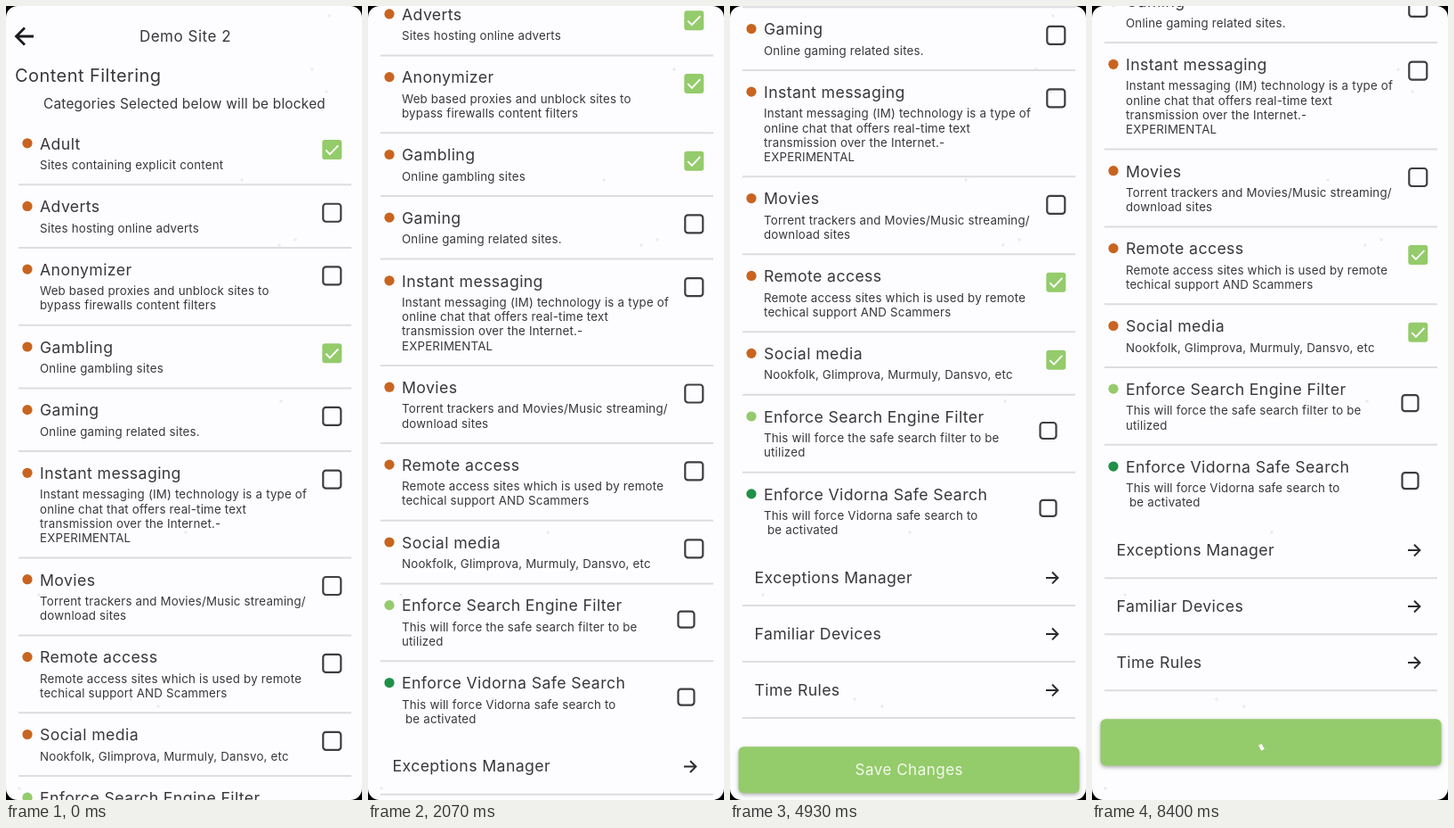
An HTML page that plays this animation: 400x890 px, repeating every 8.47 s.

```html
<!DOCTYPE html>
<html lang="en">
<head>
<meta charset="utf-8">
<title>Content Filtering</title>
<style>
  html, body { margin: 0; width: 100%; height: 100%; overflow: hidden; background: #000; }
  svg { display: block; width: 400px; height: 890px; border-radius: 13px; background: #fdfcfe; }
  text { font-family: Inter, "Open Sans", sans-serif; fill: #38373b; white-space: pre; }
  .bar { font-size: 17px; letter-spacing: .52px; }
  .head { font-size: 20px; letter-spacing: .45px; }
  .note { font-size: 15.4px; letter-spacing: .22px; }
  .title { font-size: 17.7px; letter-spacing: .38px; }
  .sub { font-size: 13.3px; letter-spacing: .2px; }
  .save { font-size: 17px; letter-spacing: .5px; fill: #f3faec; }
  .line { stroke: #dddce0; stroke-width: 2; }
  .arrow { fill: none; stroke: #2b2a2e; stroke-width: 2; }
  .back { fill: none; stroke: #1b1a1d; stroke-width: 2.8; }
  .box { fill: none; stroke: #3e3d42; stroke-width: 2.2; }
  .tick { fill: none; stroke: #fff; stroke-width: 1.9; }
  .button { fill: #94cb6b; filter: drop-shadow(0 2px 2px rgba(0, 0, 0, .3)); }
  .spin { fill: none; stroke: #fff; stroke-width: 4; stroke-linecap: square; }
  .speck { fill: #edebf0; }
</style>
</head>
<body>
<svg id="stage" viewBox="0 0 400 890"></svg>
<script>
(() => {
const LOOP = 8470;
const GREEN = '#94cb6b', ORANGE = '#c8641f', DARK = '#1f9048';
const stage = document.getElementById('stage');

function add(parent, tag, attrs, content) {
  const node = document.createElementNS('http://www.w3.org/2000/svg', tag);
  for (const key in attrs) node.setAttribute(key, attrs[key]);
  if (content) node.textContent = content;
  parent.appendChild(node);
  return node;
}

// on: time of the tap, or -1000 when ticked from the start
const rows = [
  { title: 'Adult', sub: ['Sites containing explicit content'], on: -1000 },
  { title: 'Adverts', sub: ['Sites hosting online adverts'], on: 415 },
  { title: 'Anonymizer', sub: ['Web based proxies and unblock sites to', 'bypass firewalls content filters'], on: 745 },
  { title: 'Gambling', sub: ['Online gambling sites'], on: -1000 },
  { title: 'Gaming', sub: ['Online gaming related sites.'] },
  { title: 'Instant messaging', sub: ['Instant messaging (IM) technology is a type of',
    'online chat that offers real-time text', 'transmission over the Internet.-', 'EXPERIMENTAL'] },
  { title: 'Movies', sub: ['Torrent trackers and Movies/Music streaming/', 'download sites'] },
  { title: 'Remote access', sub: ['Remote access sites which is used by remote', 'techical support AND Scammers'], on: 3200 },
  { title: 'Social media', sub: ['Nookfolk, Glimprova, Murmuly, Dansvo, etc'], on: 4210 },
  { title: 'Enforce Search Engine Filter', sub: ['This will force the safe search filter to be', 'utilized'], dot: GREEN, small: true },
  { title: 'Enforce Vidorna Safe Search', sub: ['This will force Vidorna safe search to', ' be activated'], dot: DARK, small: true }
];
const links = ['Exceptions Manager', 'Familiar Devices', 'Time Rules'];

const specks = [[344, 71], [363, 11], [360, 96], [265, 195], [325, 262], [307, 268],
  [309, 443], [37, 660], [140, 777], [171, 785], [15, 877], [202, 590]];
for (const [cx, cy] of specks) add(stage, 'circle', { class: 'speck', cx, cy, r: 1.8 });

const page = add(stage, 'g', {});
const ticks = [];

function label(cls, x, y, content, anchor = 'start') {
  return add(page, 'text', { class: cls, x, y, 'text-anchor': anchor }, content);
}

function divider(y) {
  add(page, 'line', { class: 'line', x1: 14, x2: 388, y1: y, y2: y });
}

function checkbox(cx, cy, size, on) {
  const g = add(page, 'g', { transform: `translate(${cx} ${cy})` });
  const square = (s, attrs) => add(g, 'rect', { x: -s / 2, y: -s / 2, width: s, height: s, rx: 3.2, ...attrs });
  const box = square(size, { class: 'box' });
  if (on === undefined) return;
  const fill = square(size + 2, { fill: GREEN });
  const tick = add(g, 'path', { class: 'tick', d: 'M-7 .3L-2.4 5L7 -4.8', pathLength: 1, 'stroke-dasharray': '1 2' });
  ticks.push({ on, box, fill, tick });
}

// Header
add(page, 'path', { class: 'back', d: 'M31 34H12M21 24.5L11.5 34L21 43.5' });
label('bar', 201.5, 39.5, 'Demo Site 2', 'middle');
label('head', 10, 85.3, 'Content Filtering');
label('note', 42, 114.6, 'Categories Selected below will be blocked');

// Categories
let rowTop = 129.6;
rows.forEach((row, i) => {
  add(page, 'circle', { cx: 24, cy: rowTop + 24.2, r: 5.6, fill: row.dot || ORANGE });
  label('title', 38, rowTop + 31, row.title);
  row.sub.forEach((s, n) => label('sub', s[0] === ' ' ? 42 : 38, rowTop + 53.3 + n * 16.25, s.trim()));
  if (row.small) checkbox(357.5, rowTop + 40.2, 18, row.on);
  else checkbox(366.3, rowTop + 31.5, 20, row.on);
  rowTop += 54.4 + 16.25 * row.sub.length;
  if (i < rows.length - 1) divider(rowTop);
});

// Links
links.forEach((name, i) => {
  const y = 1067.7 + i * 63;
  label('title', 27.5, y + 6.2, name);
  add(page, 'path', { class: 'arrow', d: `M355 ${y + .4}h13m-6 -6.4l6.4 6.4l-6.4 6.4` });
  divider(y + 31.5);
});

// Save button
add(page, 'rect', { class: 'button', x: 9.5, y: 1257.3, width: 383, height: 52.2, rx: 6 });
const saveText = label('save', 201.3, 1289.2, 'Save Changes', 'middle');
const spinner = add(page, 'path', { class: 'spin' });

const clamp = v => Math.min(1, Math.max(0, v));

const flings = [
  { from: 1205, to: 1900, by: 215.5, power: 3.4 },
  { from: 2205, to: 3030, by: 161, power: 3 },
  { from: 4805, to: 5700, by: 81.5, power: 6.4 }
];

function scrollAt(t) {
  return flings.reduce((y, f) => y + f.by * (1 - (1 - clamp((t - f.from) / (f.to - f.from))) ** f.power), 0);
}

// cubic-bezier(.4, 0, .2, 1)
function ease(x) {
  let lo = 0, hi = 1, u = .5;
  for (let i = 0; i < 24; i++) {
    u = (lo + hi) / 2;
    if (1.2 * u * (1 - u) ** 2 + .6 * u * u * (1 - u) + u ** 3 < x) lo = u; else hi = u;
  }
  return u * u * (3 - 2 * u);
}

const SPIN_START = 6980, SPIN_SWEEP = 1333, SPIN_TURN = 2222;

function spinPath(t) {
  const cycle = t / SPIN_SWEEP % 1;
  const head = ease(clamp(cycle * 2)) * 270;
  const tail = ease(clamp(cycle * 2 - 1)) * 270;
  const start = -90 + tail + t / SPIN_TURN * 360 + cycle * 90;
  const sweep = Math.max(head - tail, .1);
  const point = deg => {
    const a = deg * Math.PI / 180;
    return `${201 + 12 * Math.cos(a)} ${1283.4 + 12 * Math.sin(a)}`;
  };
  return `M${point(start)}A12 12 0 ${sweep > 180 ? 1 : 0} 1 ${point(start + sweep)}`;
}

function draw(t) {
  page.setAttribute('transform', `translate(0 ${-scrollAt(t)})`);
  for (const { on, box, fill, tick } of ticks) {
    const p = clamp((t - on) / 130);
    box.setAttribute('opacity', p < 1 ? 1 : 0);
    fill.setAttribute('opacity', clamp(p * 2));
    tick.setAttribute('opacity', p > .5 ? 1 : 0);
    tick.setAttribute('stroke-dashoffset', 1 - clamp(p * 2 - 1));
  }
  const saving = t >= SPIN_START;
  saveText.setAttribute('visibility', saving ? 'hidden' : 'visible');
  spinner.setAttribute('visibility', saving ? 'visible' : 'hidden');
  if (saving) spinner.setAttribute('d', spinPath(t - SPIN_START));
}

const begin = performance.now();
function play() {
  draw((performance.now() - begin) % LOOP);
  requestAnimationFrame(play);
}
play();
})();
</script>
</body>
</html>
```
